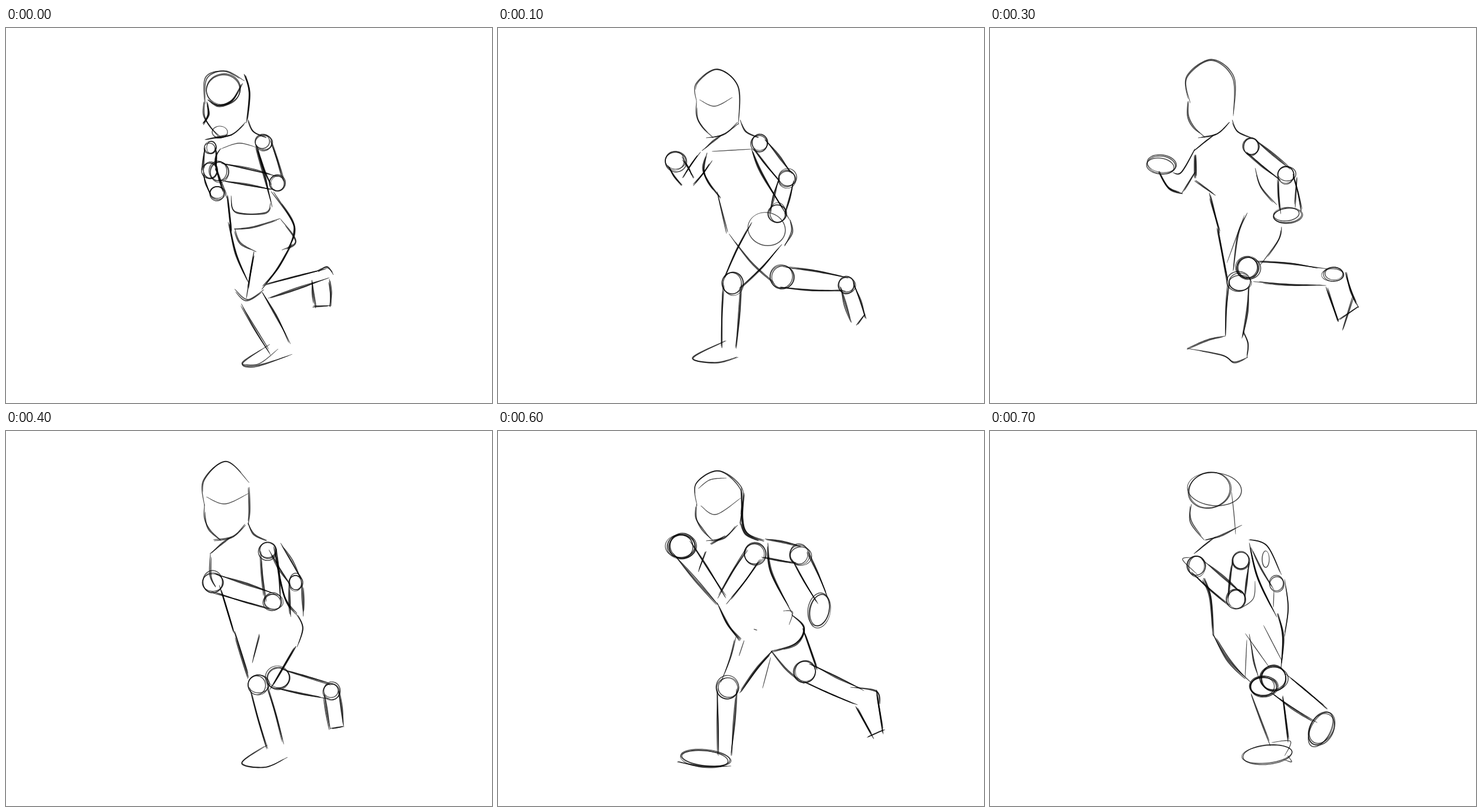
Write an HTML page with a canvas that moves like this. It is 825 px wide and 638 px high and loops after 0.8 s.

```html
<!DOCTYPE html>
<html lang="en">
<head>
<meta charset="utf-8">
<title>Run cycle</title>
<style>
html, body { margin: 0; width: 100%; height: 100%; overflow: hidden; background: #fff; }
canvas { display: block; }
</style>
</head>
<body>
<canvas id="stage" width="825" height="638"></canvas>
<script>
const ctx = document.getElementById('stage').getContext('2d');
let seed = 1;
const rnd = () => (seed = seed * 16807 % 2147483647) / 2147483647;
const jit = a => (rnd() * 2 - 1) * a;
const spline = (a, b, c, d, t) =>
  b + t * (c - a + t * (2 * a - 5 * b + 4 * c - d + t * (3 * (b - c) + d - a))) / 2;

function smooth(pts) {
  const out = [], last = pts.length - 1;
  const at = i => pts[Math.max(0, Math.min(last, i))];
  for (let s = 0; s < last; s++)
    for (let k = 0; k < 12; k++)
      out.push([0, 1].map(c => spline(at(s - 1)[c], at(s)[c], at(s + 1)[c], at(s + 2)[c], k / 12)));
  out.push(pts[last]);
  return out;
}

// A pen line that swells in the middle and thins at both ends.
function ink(line, width) {
  const n = line.length - 1, left = [], right = [];
  line.forEach(([x, y], i) => {
    const p = line[Math.max(0, i - 1)], q = line[Math.min(n, i + 1)];
    const dx = q[0] - p[0], dy = q[1] - p[1], len = Math.hypot(dx, dy) || 1;
    const r = width * (.25 + .8 * Math.sqrt(Math.abs(Math.sin(Math.PI * i / n)))) / 2;
    left.push([x - dy / len * r, y + dx / len * r]);
    right.unshift([x + dy / len * r, y - dx / len * r]);
  });
  ctx.beginPath();
  left.concat(right).forEach(p => ctx.lineTo(...p));
  ctx.fill();
}

// Repeated passes over the same curve, each slightly off.
function pen(passes, width, v) {
  for (let p = 0; p < passes; p++) {
    const slip = p ? 2.3 : 0, pts = [];
    for (let i = 0; i < v.length; i += 2) pts.push([v[i] + jit(slip), v[i + 1] + jit(slip)]);
    const line = smooth(pts), n = line.length;
    const cut = () => p ? Math.floor(rnd() * n * .22) : 0;
    ink(line.slice(cut(), n - cut()), width);
  }
}
const thin = (...v) => pen(1, 1.3, v);
const line = (...v) => pen(2, 1.7, v);
const bold = (...v) => pen(3, 2.2, v);

function ring(cx, cy, rx, ry = rx, turn = 0, passes = 3) {
  const a = turn * Math.PI / 180;
  for (let p = 0; p < passes; p++) {
    const slip = p ? 2.3 : 0, start = rnd() * 6.3, pts = [];
    const x0 = cx + jit(slip), y0 = cy + jit(slip), w = rx + jit(slip), h = ry + jit(slip);
    for (let i = 0; i <= 48; i++) {
      const t = start + i / 7.2, x = w * Math.cos(t), y = h * Math.sin(t);
      pts.push([x0 + x * Math.cos(a) - y * Math.sin(a), y0 + x * Math.sin(a) + y * Math.cos(a)]);
    }
    ink(pts, 1.5);
  }
}

// Joints as x, y, radius; a negative radius leaves the joint without a ring.
function limb(...v) {
  for (let i = 0; i < v.length; i += 3) {
    const [x, y, r, x2, y2, r2] = v.slice(i);
    if (r > 0) ring(x, y, r);
    if (x2 === undefined) break;
    const dx = x2 - x, dy = y2 - y, len = Math.hypot(dx, dy);
    for (const side of [-.88, .88]) {
      const a = side * Math.abs(r), b = side * Math.abs(r2), m = (a + b) * .54;
      pen(3, 1.7, [x - dy / len * a, y + dx / len * a,
        x + dx / 2 - dy / len * m, y + dy / 2 + dx / len * m, x2 - dy / len * b, y2 + dx / len * b]);
    }
  }
}

function face() {
  line(337, 124, 337, 149, 347, 169, 365, 186);
  line(353, 187, 384, 181, 407, 160);
  line(411, 156, 420, 176, 442, 187);
}
const collar = () => line(383, 180, 366, 193, 346, 209);
const nape = () => line(413, 95, 414, 135, 411, 160);

function passA() {
  face();
  ring(369, 104, 29, 26, -10, 2);
  line(338, 130, 341, 86, 372, 73, 405, 90);
  bold(404, 78, 413, 110, 408, 162);
  bold(342, 122, 362, 132, 385, 122, 402, 94);
  bold(341, 125, 343, 148, 335, 165);
  ring(363, 177, 13, 10, 0, 1);
  line(339, 190, 384, 182);
  thin(364, 206, 395, 196, 425, 203);
  line(364, 205, 355, 230, 375, 290);
  bold(424, 200, 436, 240, 452, 305);
  line(382, 285, 390, 314, 440, 314, 449, 298);
  bold(375, 285, 383, 345);
  bold(450, 278, 484, 325, 490, 350, 478, 376);
  line(388, 342, 420, 338, 466, 324);
  line(388, 340, 398, 365, 425, 381);
  line(466, 325, 492, 362, 468, 378);
  limb(437, 195, 14, 460, 264, 13, 362, 244, 16);
  limb(347, 203, 10, 345, 243, 13, 358, 282, 12);
  bold(377, 330, 391, 385, 412, 434);
  bold(421, 380, 416, 410, 408, 460);
  bold(484, 368, 460, 410, 434, 445);
  line(388, 444, 410, 462, 438, 445);
  limb(417, 459, -23, 466, 547, -22);
  line(448, 538, 402, 570, 425, 576, 486, 555);
  thin(402, 572, 430, 571, 462, 546);
  limb(441, 449, -13, 547, 417, -9);
  limb(534, 428, -17, 538, 476, -14);
  line(530, 415, 545, 406, 556, 420);
  line(520, 475, 552, 472);
}

function pushA() {
  face(); collar();
  line(337, 125, 336, 95, 372, 70, 408, 100, 408, 165);
  thin(342, 122, 368, 133, 398, 118);
  thin(363, 210, 430, 206);
  bold(355, 212, 349, 240, 358, 264, 378, 290);
  line(372, 278, 388, 350);
  bold(430, 205, 448, 248, 496, 328);
  line(496, 326, 500, 348, 486, 370);
  ring(456, 342, 32, 28, 15, 1);
  limb(443, 197, 14, 490, 256, 14, 474, 316, 15);
  limb(354, 218, -14, 322, 262, -13, 300, 226, 16);
  limb(456, 350, -36, 398, 434, 18, 392, 545, -14);
  line(386, 532, 330, 561, 370, 570, 408, 560);
  line(392, 350, 430, 400, 470, 436);
  limb(482, 424, 20, 592, 436, 13, 612, 498, -14);
  line(622, 488, 608, 506);
}

function strideA() {
  face();
  bold(384, 78, 406, 104, 410, 130, 408, 175);
  bold(333, 125, 331, 146, 341, 170, 378, 188);
  line(336, 124, 329, 142, 334, 162);
  thin(358, 215, 432, 208);
  thin(380, 188, 388, 250, 416, 320);
  thin(387, 217, 424, 245);
  thin(418, 257, 440, 248);
  bold(356, 215, 347, 240, 358, 264, 381, 298);
  bold(368, 275, 376, 310, 384, 356);
  bold(434, 208, 455, 245, 503, 328);
  line(503, 325, 490, 364);
  ring(468, 331, 37, 32, 20, 2);
  ring(366, 233, 11, 20, 10, 1);
  limb(370, 208, -17, 305, 246, -15, 258, 212, -14);
  ring(274, 209, 29, 12, -4);
  limb(447, 199, 15, 513, 242, 13, 540, 315, 17);
  limb(470, 333, -41, 381, 425, 19, 338, 548, -13);
  line(276, 515, 300, 523, 338, 528);
  bold(276, 515, 310, 556, 347, 570);
  line(485, 372, 510, 406);
  bold(395, 350, 440, 400, 502, 441);
  ring(513, 424, 24, 17);
  limb(511, 425, -18, 622, 446, -17);
  ring(640, 443, 8, 14, 0, 2);
  bold(645, 435, 668, 498, 654, 514);
  bold(610, 460, 659, 522);
}

function downA() {
  face(); collar();
  line(340, 128, 334, 85, 375, 55, 412, 85, 413, 150);
  bold(349, 215, 349, 256);
  line(347, 260, 383, 285);
  bold(372, 280, 390, 350);
  bold(385, 340, 404, 431);
  line(450, 238, 460, 270, 487, 301);
  line(495, 338, 490, 360, 459, 403);
  line(437, 314, 422, 350, 413, 412);
  thin(432, 318, 402, 400);
  ring(291, 233, 24, 15, 8);
  bold(286, 245, 303, 272, 327, 282);
  line(310, 246, 325, 245, 348, 205);
  line(325, 282, 348, 245);
  limb(443, 201, 14, 502, 250, 14, 511, 314, -20);
  line(521, 255, 518, 306);
  ring(505, 319, 24, 12, -5);
  ring(437, 409, 18, 19, 0, 5);
  ring(424, 432, 18, 15);
  limb(423, 434, -20, 414, 525, -16);
  line(400, 524, 370, 530, 335, 545);
  line(334, 545, 393, 556, 414, 568, 438, 560);
  line(430, 515, 438, 538, 436, 562);
  limb(448, 414, -20, 572, 424, -16);
  ring(583, 419, 17, 12);
  bold(605, 415, 612, 448, 626, 476);
  bold(570, 440, 592, 500);
  line(590, 497, 626, 474);
  line(616, 455, 598, 515);
}

function passB() {
  face(); collar(); nape();
  line(337, 128, 335, 84, 374, 52, 413, 88);
  thin(340, 112, 372, 124, 412, 106);
  line(347, 208, 346, 245, 356, 266);
  bold(362, 262, 388, 345);
  bold(454, 196, 472, 280, 492, 312);
  line(492, 310, 504, 335, 494, 368);
  line(430, 345, 418, 395);
  limb(445, 203, 14, 453, 290, 15, 351, 258, 17);
  limb(456, 196, -13, 492, 258, 12, 494, 316, -12);
  bold(388, 340, 412, 420);
  bold(492, 366, 448, 440);
  limb(428, 432, 17, 458, 537, -16);
  line(444, 534, 400, 565, 440, 572, 478, 555);
  limb(462, 421, 19, 552, 444, 14, 562, 506, -13);
  line(550, 506, 572, 503);
}

function pushB() {
  face(); collar();
  ring(378, 91, 37, 32, 0, 2);
  ring(373, 90, 46, 34, -5, 1);
  line(337, 72, 340, 115, 333, 150);
  thin(338, 135, 375, 138, 412, 116);
  line(414, 100, 412, 145, 402, 168);
  thin(352, 207, 349, 228);
  bold(462, 195, 480, 245, 503, 306);
  bold(390, 315, 401, 392);
  bold(510, 325, 490, 365, 445, 412);
  thin(510, 338, 502, 372, 480, 392);
  thin(470, 364, 500, 335);
  line(426, 335, 410, 375, 402, 420);
  limb(456, 191, -15, 516, 246, 17, 514, 320, 18);
  limb(447, 206, 13, 423, 297, 16, 350, 247, 18);
  ring(447, 206, 10, 11);
  ring(414, 435, 14, 17);
  line(400, 400, 402, 446);
  bold(402, 445, 415, 490, 438, 526);
  bold(440, 420, 460, 465, 470, 512);
  line(470, 500, 476, 530, 455, 553);
  line(437, 526, 410, 545, 380, 574);
  line(382, 566, 430, 570, 478, 545);
  line(428, 405, 460, 468);
  ring(466, 417, 24, 18, -15, 2);
  line(468, 396, 525, 402);
  bold(500, 400, 550, 450, 582, 500);
  bold(455, 430, 500, 470, 545, 498);
  ring(541, 520, 33, 20, -18, 2);
  thin(497, 532, 512, 550, 545, 540, 582, 506);
  line(575, 500, 584, 506, 581, 489);
  thin(561, 407, 569, 409);
}

function strideB() {
  face(); nape();
  line(338, 128, 336, 90, 375, 68, 412, 100, 412, 142);
  thin(340, 98, 360, 83, 388, 80);
  thin(344, 127, 370, 142, 412, 114);
  line(360, 192, 386, 178);
  bold(418, 105, 414, 150, 422, 175, 452, 188);
  line(352, 205, 340, 240);
  bold(458, 190, 465, 240, 500, 312);
  bold(498, 312, 519, 335, 505, 362, 463, 377);
  bold(372, 292, 390, 330, 412, 356);
  thin(418, 356, 409, 383);
  thin(484, 306, 500, 308, 494, 330);
  thin(434, 337, 440, 339);
  limb(435, 209, 17, 380, 290, -10, 311, 197, 20);
  ring(311, 197, 24, 21);
  limb(450, 199, -18, 512, 211, 17, 552, 290, -11);
  ring(546, 305, 16, 27, 12);
  line(404, 350, 395, 385, 378, 428);
  bold(465, 375, 440, 405, 410, 446);
  thin(463, 385, 449, 438);
  limb(389, 438, 18, 384, 552, -13);
  ring(352, 556, 42, 14, 6);
  line(305, 562, 345, 571, 396, 570);
  bold(517, 335, 541, 405);
  line(465, 375, 490, 405, 520, 430);
  limb(521, 410, 18, 616, 454, -15);
  line(598, 436, 642, 442, 647, 465);
  bold(642, 440, 654, 516);
  bold(608, 470, 638, 524);
  line(628, 520, 657, 508);
}

function downB() {
  line(342, 124, 340, 155, 364, 186);
  line(365, 186, 390, 178, 428, 160);
  collar();
  ring(373, 101, 37, 30, -15, 2);
  ring(381, 99, 46, 28, 5, 1);
  thin(410, 104, 414, 140, 417, 176);
  bold(362, 250, 375, 285, 380, 350);
  bold(378, 345, 405, 390, 442, 427);
  bold(440, 190, 455, 250, 487, 317);
  bold(489, 310, 497, 350, 494, 405);
  thin(464, 330, 496, 392);
  line(440, 345, 448, 390, 456, 420);
  thin(436, 355, 433, 420);
  thin(433, 344, 474, 402);
  limb(426, 221, 15, 418, 287, 16, 350, 229, 16);
  thin(342, 215, 327, 219, 352, 244);
  thin(450, 255, 447, 285, 425, 302);
  line(439, 185, 470, 195, 495, 245);
  line(443, 198, 460, 235, 482, 270);
  ring(487, 261, 12, 13, 0, 2);
  line(500, 252, 506, 300, 500, 350);
  thin(482, 272, 481, 300);
  ring(468, 218, 6, 14, 0, 1);
  ring(464, 436, 22, 17, 0, 5);
  ring(480, 420, 22, 20, 0, 5);
  line(443, 448, 460, 495, 476, 536);
  bold(497, 450, 506, 530);
  ring(470, 550, 43, 15, -6, 2);
  thin(478, 530, 510, 528, 500, 553);
  thin(497, 558, 512, 563, 505, 552);
  limb(489, 429, -23, 564, 485, -16);
  ring(562, 506, 18, 30, 28, 4);
}

const cycle = [passA, pushA, strideA, downA, passB, pushB, strideB, downB];
let shown = -1;

function tick(now) {
  const i = Math.floor(now % 800 / 100);
  if (i !== shown) {
    shown = i;
    seed = 4321 + i * 977;
    ctx.fillStyle = '#fff';
    ctx.fillRect(0, 0, 825, 638);
    ctx.fillStyle = 'rgba(0,0,0,.7)';
    cycle[i]();
  }
  requestAnimationFrame(tick);
}
tick(performance.now());
</script>
</body>
</html>
```
